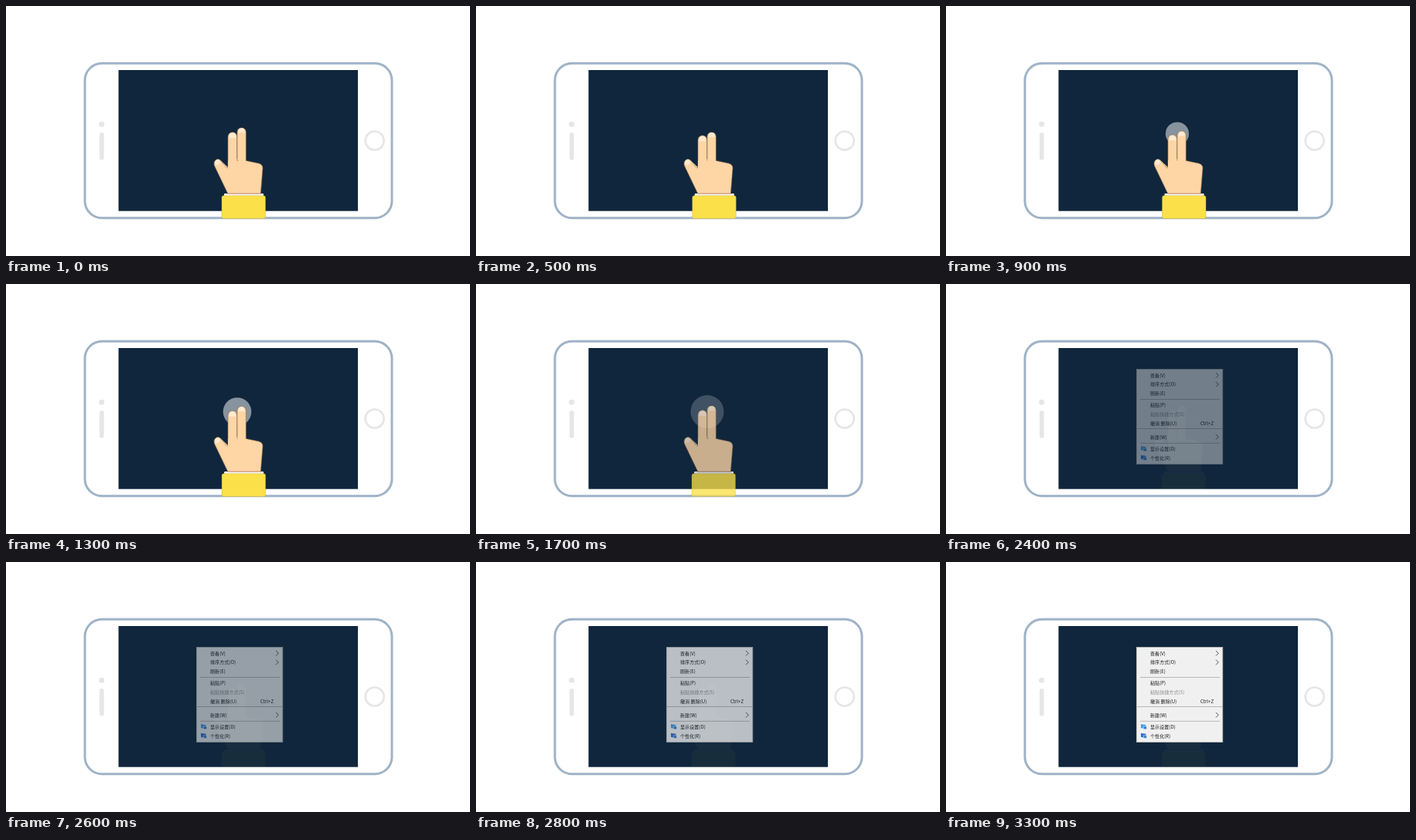
Recreate the animation shown at these times as an HTML page. Size 600x324 px, loop 4.9 s.

```html
<!DOCTYPE html>
<html lang="zh-CN">
<head>
<meta charset="utf-8">
<title>Two-finger tap</title>
<style>
html, body { margin: 0; width: 100%; height: 100%; overflow: hidden; background: #fff; }
svg { display: block; width: 600px; height: 324px; }
text { font: 6.1px "Noto Sans CJK SC", "Noto Sans CJK", "Noto Sans", sans-serif; fill: #1c1c1c; }
.skin { fill: #fed5a5; stroke: #8c6c4c; stroke-width: .6; }
.nail { fill: #ffead3; }
.line { fill: none; stroke: #a9a9a9; stroke-width: .8; }
.arrow { fill: none; stroke: #333; stroke-width: .8; }
</style>
</head>
<body>
<svg viewBox="0 0 600 324">
  <clipPath id="screen"><rect x="145.5" y="83" width="309.5" height="182.7"/></clipPath>

  <rect x="102" y="74.3" width="397" height="200.4" rx="22" fill="#fff" stroke="#9fb3c7" stroke-width="3"/>
  <rect x="145.5" y="83" width="309.5" height="182.7" fill="#0f263c"/>
  <g fill="#e6e6e6">
    <circle cx="123.7" cy="153.2" r="3.5"/>
    <rect x="121" y="164" width="5.6" height="35.5" rx="2.8"/>
  </g>
  <circle cx="476.7" cy="174.5" r="12" fill="none" stroke="#e6e6e6" stroke-width="2.6"/>

  <circle id="ripple" cx="299" cy="165.5" fill="#fff"/>

  <g id="menu">
    <rect x="246.4" y="110.4" width="111.4" height="123" fill="#f0f0f0" stroke="#b5b5b5" stroke-width=".8"/>
    <path class="line" d="M251 149.5H354M247 187.5H357.500M251 206.300H354"/>
    <g id="items"></g>
  </g>

  <g id="hand">
    <g id="middle">
      <path class="skin" d="M287 220V169.500a5.900 5.900 0 0 1 11.800 0V220"/>
      <path class="nail" d="M288.700 172V168.500a4.200 3.900 0 0 1 8.400 0V172q-4.200 -2.500 -8.400 0"/>
    </g>
    <g id="index">
      <path class="skin" d="M299 198V163a5.700 5.800 0 0 1 11.300 0V220"/>
      <path class="nail" d="M300.700 165V162a4 3.800 0 0 1 8 0V165q-4 -2.500 -8 0"/>
    </g>
    <path fill="#fed5a5" d="M287 209V200.500H298.500V198H299.500V200.500H310L327 204Q332 205.500 332 210L329.300 243.500H287L269.500 207C267.500 201 273 195.500 278 200.500Z"/>
    <path fill="none" stroke="#8c6c4c" stroke-width=".6" d="M310.300 200.300L327 204Q332 205.500 332 210L329.300 243.500M287 243.500L269.500 207C267.500 201 273 195.500 278 200.500L285.500 210L287 209.500"/>
    <path class="nail" d="M270.500 206C269 200 274 197 277.500 201.500Q276.500 206 270.500 206"/>
    <g id="sleeve">
      <rect x="282" y="243" width="51" height="5" rx="1" fill="#fff"/>
      <path d="M286 243.200H330" stroke="#a8604a" stroke-width=".8"/>
      <rect x="279" y="245.700" width="56.500" height="29.800" rx="2.500" fill="#fbe049" stroke="#b9a640" stroke-width=".4"/>
    </g>
  </g>
</svg>
<script>
const LOOP = 4900, STEP = 100;
const $ = id => document.getElementById(id);
const clamp = (v, lo = 0, hi = 1) => Math.min(hi, Math.max(lo, v));
const ramp = (t, from, to) => clamp((t - from) / (to - from));

const label = (text, y, x = 264, fill = '#1c1c1c') =>
  `<text x="${x}" y="${y + 2.2}" style="fill:${fill}">${text}</text>`;
const arrow = y => `<path class="arrow" d="M349 ${y - 3.3}l3.300 3.300l-3.300 3.300"/>`;
const icon = (y, fill) =>
  `<path fill="${fill}" d="M252 ${y - 3.5}l6.500 1v5.500l-6.500 -1.500z"/>` +
  `<path fill="#2f7fc4" stroke="#f0f0f0" stroke-width=".5" d="M255.500 ${y - .5}h4v3.500h-4z"/>`;

$('items').innerHTML =
  label('查看(V)', 118.5) + arrow(118.3) +
  label('排序方式(O)', 130.2) + arrow(130) +
  label('刷新(E)', 141.8) +
  label('粘贴(P)', 157) +
  label('粘贴快捷方式(S)', 168.7, 264, '#8d8d8d') +
  label('撤消 删除(U)', 180.4) + label('Ctrl+Z', 180.4, 329) +
  label('新建(W)', 198.4) + arrow(198.2) +
  label('显示设置(D)', 213.6) + icon(213.6, '#4c9fe0') +
  label('个性化(R)', 225.3) + icon(225.3, '#3a6fd0');

function draw(t) {
  const press = t < 600 ? t / 600 : 1 - ramp(t, 600, 1400);
  $('index').setAttribute('transform', `translate(0 ${7 * press})`);
  $('middle').setAttribute('transform', `translate(0 ${5 * press})`);
  $('sleeve').setAttribute('transform', `translate(${.9 * press} 0)`);

  // A faint trace of the hand remains on the screen after it leaves.
  const gone = t >= 2000;
  $('hand').setAttribute('opacity', t < 2050 ? Math.max(.04, 1 - ramp(t, 1600, 2050)) : .04);
  $('hand').setAttribute('clip-path', gone ? 'url(#screen)' : 'none');
  if (gone && t >= 2100) $('menu').before($('hand'));
  else $('menu').after($('hand'));

  $('ripple').setAttribute('r', clamp(18.3 + (t - 1300) / 125, 0, 22.5));
  $('ripple').setAttribute('opacity', .5 * ramp(t, 600, 900) * (1 - ramp(t, 1400, 1900)));
  $('menu').setAttribute('opacity', ramp(t, 1850, 3100));
}

const start = performance.now();
function tick() {
  const t = (performance.now() - start) % LOOP;
  draw(Math.floor(t / STEP) * STEP);
  requestAnimationFrame(tick);
}
tick();
</script>
</body>
</html>
```
